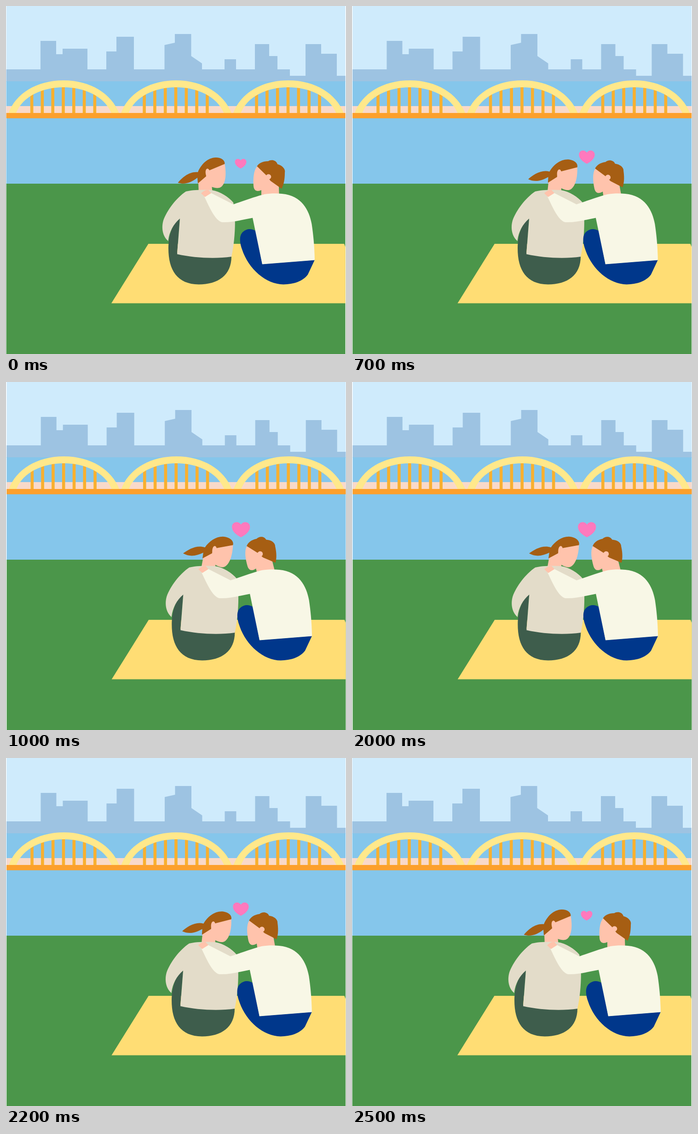
Animation of 739 by 758 pixels, one loop 2600 ms. Source, as an HTML page:

```html
<!DOCTYPE html>
<html lang="en">
<head>
<meta charset="utf-8">
<title>Picnic by the river</title>
<style>
  html, body { margin: 0; width: 100%; height: 100%; overflow: hidden; background: #fff; }
  svg { display: block; width: 739px; height: 758px; }
  .hair { fill: #a65e13; }
  .skin { fill: #ffc3ac; }
</style>
</head>
<body>
<svg viewBox="0 0 739 758">
  <defs>
    <clipPath id="opening"><path d="M22 234C36 196 79 176 125 176S214 196 229 234Z"/></clipPath>
    <g id="arch">
      <path d="M52.8 204H197" stroke="#f8b02f" stroke-width="60" stroke-dasharray="6.6 16.2" clip-path="url(#opening)"/>
      <path d="M5.5 233C21 191 66 162 125 162S229 191 245.500 233H229C214 197 171 177 125 177S36 197 22 233Z" fill="#ffe88b"/>
    </g>
  </defs>

  <g id="scene">
    <rect x=".7" width="737" height="165" fill="#cfebfc"/>
    <path d="M.7 138H75V76H109V105H123V93H177V138H218V99H240V67H278V138H344.500V85L367 80V61H402.500V109L426 125V138H475V116H500V138H541V83H572V109H590V138H617V152H651V83H685V104H719V152H737.700V165H.7Z" fill="#9dc3e2"/>
    <rect x=".7" y="164" width="737" height="224" fill="#85c6eb"/>

    <rect x=".7" y="218" width="737" height="16" fill="#f9d9c9"/>
    <use href="#arch"/>
    <use href="#arch" x="244.500"/>
    <use href="#arch" x="488.500"/>
    <rect x=".7" y="233" width="737" height="11.500" fill="#fca02c"/>

    <rect x=".7" y="387" width="737" height="371" fill="#4b964a"/>
    <path d="M309.500 518H735L737.700 525V647.500H229Z" fill="#ffdd74"/>

    <g id="woman">
      <g id="womanHead">
        <path class="skin" d="M475 342C478 357 480 382 469 393C464 398 455 397 447.500 394L449 410H419L418 382L434 350Z"/>
        <path class="hair" d="M417 362C424 345 438 330.500 456 330C468 330 476 336 475.500 344L442 358C440 353 435 353 434 359C433 364 435 368 435 371L417 386.500L416 374C403 384 390 390 373.500 385C383 374 398 360 417 362Z"/>
      </g>
      <path d="M378 462C362 474 353 498 353 528C353 575 372 606 419 606.500C462 606 491 586 490 543L372 538Z" fill="#3e5d4c"/>
      <path d="M391 404C405 400 430 400 447 401C466 404 484 416 494 428C500 455 499 505 490 546C455 551 410 549 372 540.500L378 463C363 475 354 495 352.500 512C341 502 337 485 342 467C350 445 370 418 391 404Z" fill="#e3dcc9"/>
    </g>

    <g id="man">
      <g id="manHead">
        <path class="skin" d="M546 349C538 358 537 376 538 392C539 403 546 405 555 401V424H594L593 394L575 355Z"/>
        <path class="hair" d="M545.500 349C550 342 558 338 570 338C576 334 587 335 590 344.500C600 347 608 355 606 363C606 380 603 390 599 398L575 381L565 368Z"/>
        <circle class="skin" cx="570.500" cy="372" r="5.800"/>
      </g>
      <path d="M543 490C534 485 524 484 515 492C506 500 508 517 513 530C527 573 565 606 603 606.500C625 606 645 600 656 585L671 553L557 562Z" fill="#00378b"/>
      <path d="M445 407L494 432C515 425 545 414 562 410C575 408 588 408 600 409C643 413 659 445 664.500 475C669 505 670.500 530 671 553.500L557 562.500L536 461.500C512 466 490 472 470 471C455 468 443 440 431 415Z" fill="#f8f7e6"/>
      <path class="skin" d="M424 408C428 404 434 400 440 401L446 407.500L432.500 416Z"/>
    </g>

    <path id="heart" d="M0 10.500C-5 8-12.500 3-12.500-4C-12.500-8-9.500-10.500-6-10.500C-3.500-10.500-1-9 0-7C1-9 3.500-10.500 6-10.500C9.500-10.500 12.500-8 12.500-4C12.500 3 5 8 0 10.500Z" fill="#ff79bd"/>
  </g>
</svg>
<script>
  const LOOP = 2600, STEP = 100, CLOSER = 500, APART = 2000, POSES = 6;

  const clamp = (v, max) => Math.max(0, Math.min(max, v));
  const ease = u => (1 - Math.cos(Math.PI * clamp(u, 1))) / 2;
  const place = (id, value) => document.getElementById(id).setAttribute('transform', value);

  // Steps taken since a moment, the first one at that moment
  const steps = (t, from) => clamp(Math.floor((t - from) / STEP) + 1, POSES);

  function draw() {
    const t = performance.now() % LOOP;
    const pose = steps(t, CLOSER) - steps(t, APART);
    const lean = 6.6 * clamp(pose / 3, 1);  // bodies settle first
    const turn = ease(pose / 5);            // heads and heart follow

    place('scene', `translate(${0.7 * turn})`);
    place('woman', `translate(${lean})`);
    place('man', `translate(${-lean})`);
    place('womanHead', `rotate(${12.5 * turn} 429 398)`);
    place('manHead', `rotate(${-12.3 * turn} 576 430)`);
    place('heart', `translate(510 ${343.5 - 21.8 * turn}) scale(${1 + 0.57 * turn})`);
    requestAnimationFrame(draw);
  }
  draw();
</script>
</body>
</html>
```
